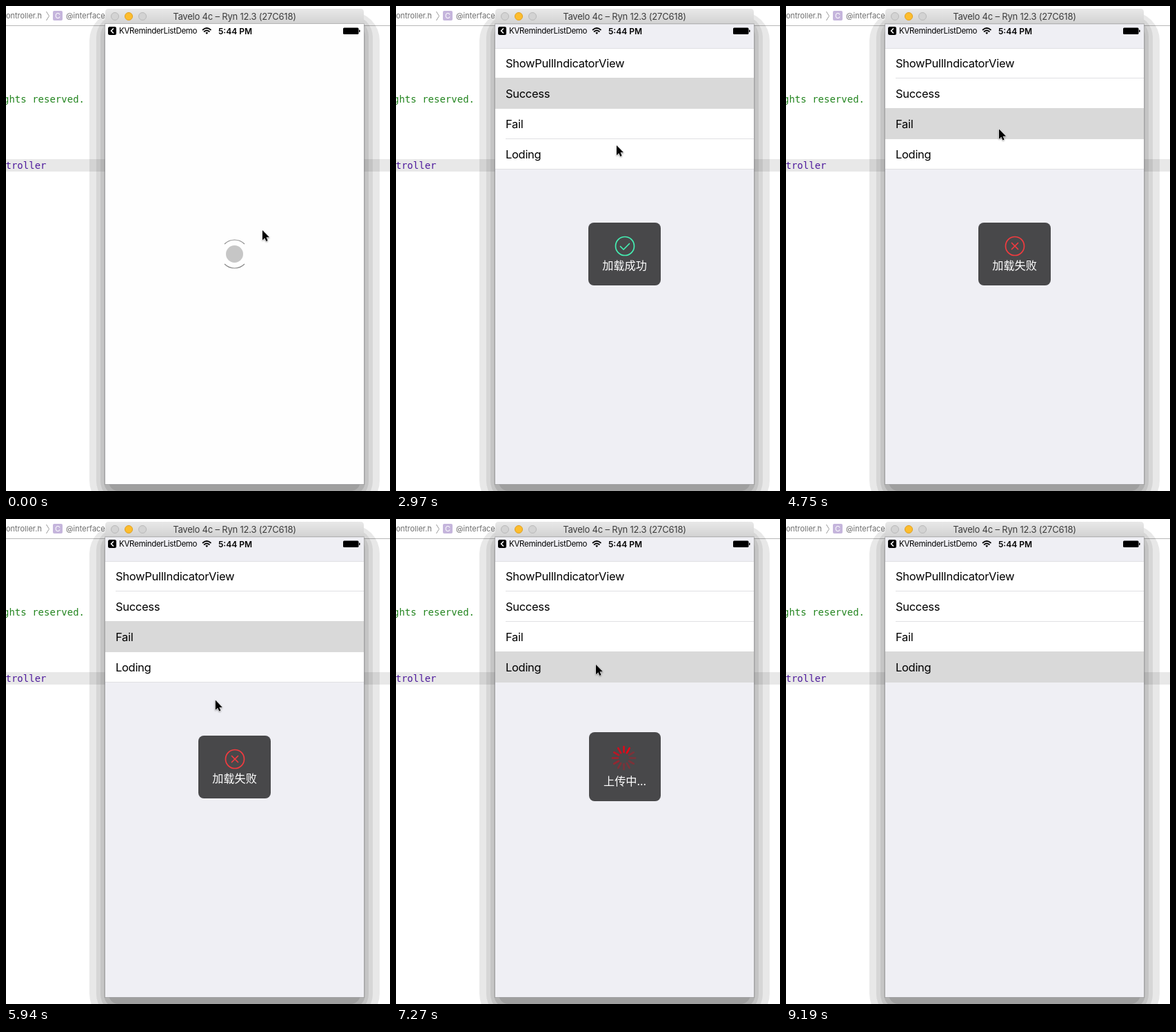
Animation of 557 by 703 pixels, one loop 9740 ms. Source, as an HTML page:

```html
<!DOCTYPE html>
<html lang="en">
<head>
<meta charset="utf-8">
<style>
  html, body { margin: 0; width: 557px; height: 703px; overflow: hidden; background: #fff; }
  svg { display: block; font-family: Inter, "Noto Sans", sans-serif; }
  .code { font: 14px "DejaVu Sans Mono", "Noto Sans Mono", monospace; text-anchor: end; }
  .crumb { font-size: 11px; fill: #6e6e6e; }
  .row { font-size: 16.5px; letter-spacing: -.3px; }
  .label { font: 500 16.2px "Noto Sans CJK SC", "Noto Sans CJK", sans-serif; fill: #fff; text-anchor: middle; }
  .line { fill: none; stroke-width: 1.7; stroke-linecap: round; stroke-linejoin: round; }
  #pointer { filter: drop-shadow(0 1px 1px #0006); }
</style>
</head>
<body>
<svg width="557" height="703" viewBox="0 0 557 703">
  <defs>
    <linearGradient id="bar" x2="0" y2="1">
      <stop stop-color="#e8e8e8"/><stop offset="1" stop-color="#d2d2d2"/>
    </linearGradient>
  </defs>

  <!-- editor behind the window -->
  <path d="M0 28.5H557" stroke="#b8b8b8"/>
  <text class="crumb" x="52" y="18" text-anchor="end">ontroller.h</text>
  <path d="M58.500 8l4 6.500-4 6.500" fill="none" stroke="#999"/>
  <rect x="68" y="7" width="14" height="14" rx="2" fill="#c5b5dc"/>
  <text x="75" y="18" font-size="11" fill="#fff" text-anchor="middle">C</text>
  <text class="crumb" x="87" y="18">@interface</text>
  <text class="code" x="114" y="140" fill="#23851f">ghts reserved.</text>
  <rect y="222" width="557" height="18" fill="#e8e8e8"/>
  <text class="code" x="58.500" y="236" fill="#4e1a9c">troller</text>

  <!-- stepped window shadow -->
  <g>
    <rect x="121" y="8" width="421" height="722" rx="42" fill-opacity=".09"/>
    <rect x="131" y="13" width="401" height="708" rx="32" fill-opacity=".08"/>
    <rect x="137" y="18" width="389" height="697" rx="26" fill-opacity=".08"/>
    <rect x="142" y="24" width="379" height="685" rx="20" fill-opacity=".1"/>
    <rect x="149" y="40" width="365" height="663" rx="14" fill-opacity=".1"/>
  </g>

  <!-- window -->
  <path d="M144 26V9q0-5 5-5H514q5 0 5 5V26Z" fill="url(#bar)"/>
  <g stroke="#b9b9b9" fill="#d3d3d3">
    <circle cx="158" cy="15" r="5.500"/>
    <circle cx="178" cy="15" r="5.500" fill="#fdbd2e" stroke="#e0a021"/>
    <circle cx="198" cy="15" r="5.500"/>
  </g>
  <text x="331.500" y="20" font-size="13" letter-spacing="-.2" fill="#3c3c3c" text-anchor="middle">Tavelo 4c – Ryn 12.3 (27C618)</text>
  <rect x="143.500" y="26" width="376" height="667.500" fill="#efeff4" stroke="#0003"/>
  <path d="M144 25.500H519" stroke="#b5b5b5"/>

  <!-- list -->
  <rect x="144" y="61" width="375" height="176" fill="#fff"/>
  <path d="M144 61.500H519M159 104.500H519M159 148.500H519M159 192.500H519M144 236.500H519" stroke="#e0e0e3"/>
  <rect id="pick" x="144" width="375" fill="#d9d9d9"/>
  <g class="row">
    <text x="159" y="89">ShowPullIndicatorView</text>
    <text x="159" y="133">Success</text>
    <text x="159" y="177">Fail</text>
    <text x="159" y="221">Loding</text>
  </g>

  <!-- refresh page -->
  <g id="page">
    <rect x="144" y="26" width="375" height="667" fill="#fefefe"/>
    <circle cx="331.500" cy="359.500" r="12.500" fill="#c6c6c6"/>
    <path id="arcs" d="M317 345a20.500 20.500 0 0 1 29 0M346 374a20.500 20.500 0 0 1-29 0" fill="none" stroke="#8c8c8c" stroke-width="1.200"/>
  </g>

  <!-- status bar -->
  <rect x="148" y="30" width="12" height="12" rx="2.500"/>
  <path d="M155.500 33l-3 3 3 3" class="line" stroke="#fff"/>
  <text x="164" y="40" font-size="11.500" letter-spacing="-.3">KVReminderListDemo</text>
  <path d="M285.500 34.500q5.700-5 11.400 0M287.500 37q3.700-3 7.400 0" class="line"  stroke="#000"/>
  <path d="M291.200 41l-2-2.200q2-1.600 4 0Z"/>
  <text x="308" y="40.500" font-size="12" font-weight="600">5:44 PM</text>
  <rect x="489" y="31.500" width="22.500" height="9.500" rx="1.500"/>
  <rect x="512" y="34.500" width="1.500" height="3.500" rx=".7"/>

  <!-- message boxes -->
  <g id="done">
    <rect x="279" y="314" width="105" height="91" rx="8" fill="#48484a"/>
    <g class="line" stroke="#45efb3"><circle cx="332" cy="348" r="13.500"/><path d="M325.500 348.500l4.500 4.500 8.500-8.500"/></g>
    <text class="label" x="331.500" y="381.500" lang="zh-CN">加载成功</text>
  </g>
  <g id="fail">
    <rect x="279" y="314" width="105" height="91" rx="8" fill="#48484a"/>
    <g class="line" stroke="#f23b3f"><circle cx="332" cy="348" r="13.500"/><path d="M327.500 343.500l9 9m0-9l-9 9"/></g>
    <text class="label" x="331.500" y="381.500" lang="zh-CN">加载失败</text>
  </g>
  <g id="busy">
    <rect x="280" y="309" width="104" height="100" rx="8" fill="#48484a"/>
    <g id="spokes" transform="translate(330.500 346.500)" stroke="#f00014" stroke-width="2.600" stroke-linecap="round"></g>
    <text class="label" x="332" y="385.500" lang="zh-CN">上传中...</text>
  </g>

  <path id="pointer" d="M0 0V14.200L3.300 11.200 5.400 16 7.600 15 5.500 10.300H10Z" stroke="#fff" stroke-width="1" paint-order="stroke"/>
</svg>
<script>
const LOOP = 9740, STEP = 148;
const $ = id => document.getElementById(id);
const clamp = v => Math.max(0, Math.min(1, v));
const set = (id, attrs) => { for (const a in attrs) $(id).setAttribute(a, attrs[a]); };

// pointer path: step, x, y
const path = [
  [0, 372, 325], [8, 372, 325], [9, 329, 238], [10, 294, 150], [11, 283, 132], [13, 284, 132],
  [16, 312, 186], [18, 327, 217], [20, 320, 202], [24, 309, 184], [28, 309, 180], [32, 309, 178.5],
  [33, 309, 178.5], [37, 313, 297], [38, 313, 297], [43, 290, 211], [50, 290, 211],
  [52, 348, 291], [54, 352, 340], [58, 352, 340], [61, 449, 531]
];
const taps = [13, 30, 47];
const boxes = [['done', 13, 28.25], ['fail', 30, 45.25], ['busy', 47, 61.9]];

$('spokes').innerHTML = Array.from({ length: 12 }, (_, i) =>
  `<path d="M0-8.500V-16.500" transform="rotate(${i * 30})"/>`).join('');
const spokes = [...$('spokes').children];

function pointerAt(k) {
  const i = path.findIndex(p => p[0] > k);
  if (i < 0) return path[path.length - 1].slice(1);
  const [a, x, y] = path[i - 1], [b, u, v] = path[i];
  const f = (k - a) / (b - a);
  return [x + (u - x) * f, y + (v - y) * f];
}

function draw(now) {
  const k = Math.floor(now % LOOP / STEP);

  const row = taps.filter(s => k >= s).length, lap = row > 0 ? 1 : 0;
  set('pick', { y: 61 + 44 * row - lap, height: 44 + lap });

  set('page', { opacity: clamp((7 - k) / 3) });
  set('arcs', { transform: `rotate(${k * 40} 331.5 359.5)` });

  for (const [id, start, end] of boxes)
    set(id, { opacity: Math.min(clamp((k - start) / 2), clamp((end - k) / 3.25)) });

  const head = 1 + Math.floor((k - 49) * STEP * 12 / 1000);
  spokes.forEach((s, i) => {
    const age = ((head - i) % 12 + 12) % 12;
    s.setAttribute('opacity', Math.max(.3, 1 - age * .11));
  });

  set('pointer', { transform: `translate(${pointerAt(k)})`, opacity: k < 62 ? 1 : 0 });
  requestAnimationFrame(() => draw(performance.now() - t0));
}
const t0 = performance.now();
draw(0);
</script>
</body>
</html>
```
